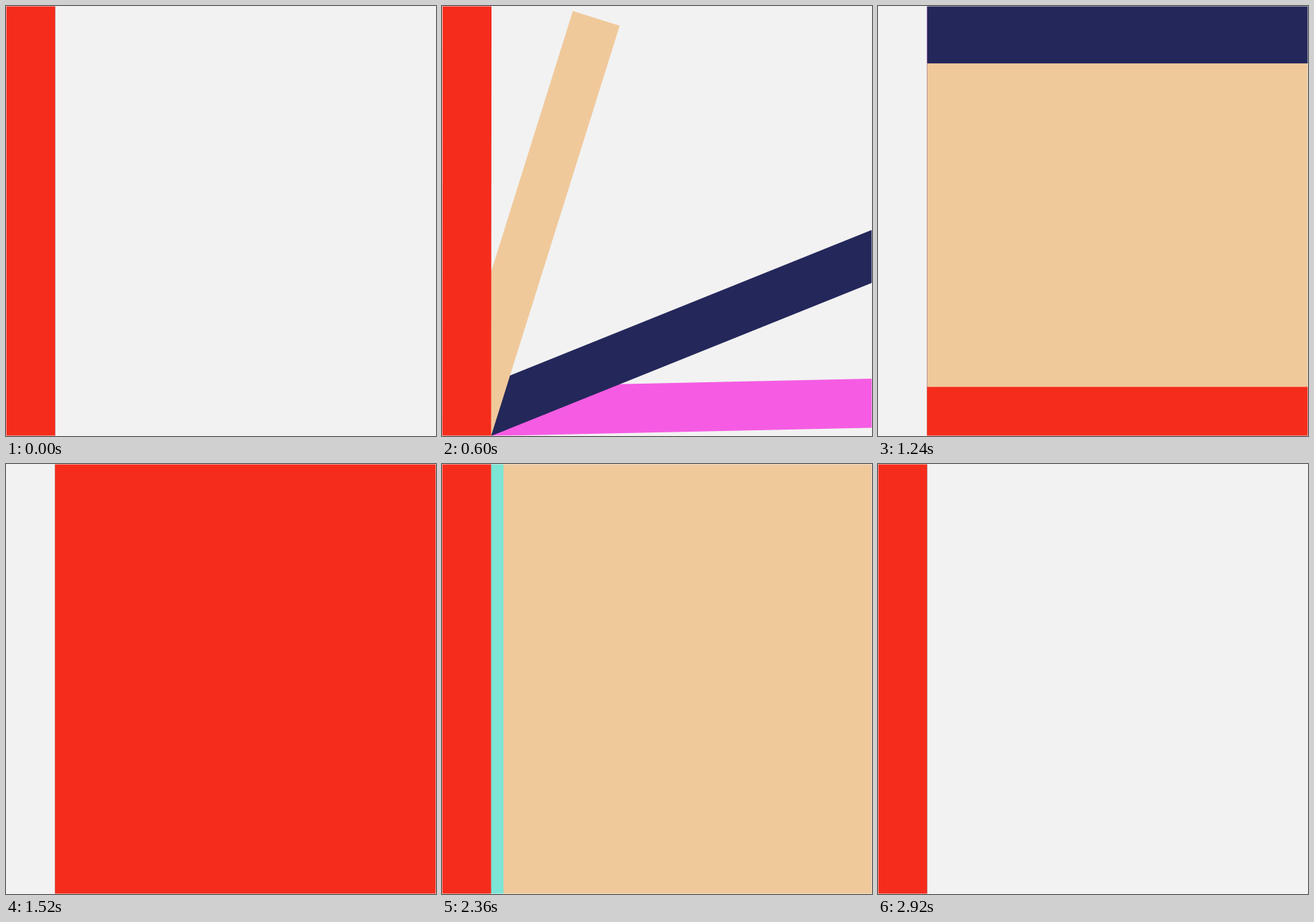
Animation, 600 px wide and 600 px high, one loop 3.24 s. Source, as an HTML page with a canvas:

```html
<!DOCTYPE html>
<html lang="en">
<head>
<meta charset="utf-8">
<title>Falling bars</title>
<style>
  html, body { margin: 0; width: 100%; height: 100%; overflow: hidden; background: #f2f2f2; }
  canvas { display: block; width: 600px; height: 600px; }
</style>
</head>
<body>
<canvas id="stage" width="600" height="600"></canvas>
<script>
const ctx = document.getElementById('stage').getContext('2d');
const LOOP = 3240, SIZE = 600, BAR = 68.5;
const FALL = 659, GROW = 283, SLIDE = 243, SLIDES_FROM = 1720;
const PAPER = '#f2f2f2';

// Bottom layer first. fall and slide are start times in ms.
const layers = [
  { color: '#f55ce3', fall: 11, slide: 2680 },
  { color: '#24275a', fall: 183, slide: 2552 },
  { color: '#f0c99b', fall: 383, slide: 2369 },
  { color: '#7ce5d5', slide: 2155 },
  { color: '#f52c1c', fall: 583, slide: 1886 },
];

const easeIn = s => (2 * s) ** 2.3 / 2;
function progress(t, start, duration) {
  const s = Math.min(1, Math.max(0, (t - start) / duration));
  return s < 0.5 ? easeIn(s) : 1 - easeIn(1 - s);
}

// A bar tips over its lower right corner, then thickens upwards.
function drawFall(t, { fall }) {
  const thickness = BAR + (SIZE - BAR) * progress(t, fall + FALL, GROW);
  ctx.save();
  ctx.translate(BAR, SIZE);
  ctx.rotate(progress(t, fall, FALL) * Math.PI / 2);
  ctx.fillRect(-thickness, -SIZE, thickness, SIZE);
  ctx.restore();
}

// A panel slides left until only a bar's width is on stage.
function drawSlide(t, { slide }) {
  const width = SIZE - BAR;
  ctx.fillRect(BAR - width * progress(t, slide, SLIDE), 0, width, SIZE);
}

function draw(t) {
  ctx.fillStyle = PAPER;
  ctx.fillRect(0, 0, SIZE, SIZE);
  const sliding = t >= SLIDES_FROM;
  for (const layer of layers) {
    ctx.fillStyle = layer.color;
    if (sliding) drawSlide(t, layer);
    else if ('fall' in layer) drawFall(t, layer);
  }
  // Soft half-pixel edge around the stage.
  ctx.strokeStyle = PAPER;
  ctx.strokeRect(0, 0, SIZE, SIZE);
}

function tick() {
  draw(performance.now() % LOOP);
  requestAnimationFrame(tick);
}
tick();
</script>
</body>
</html>
```
